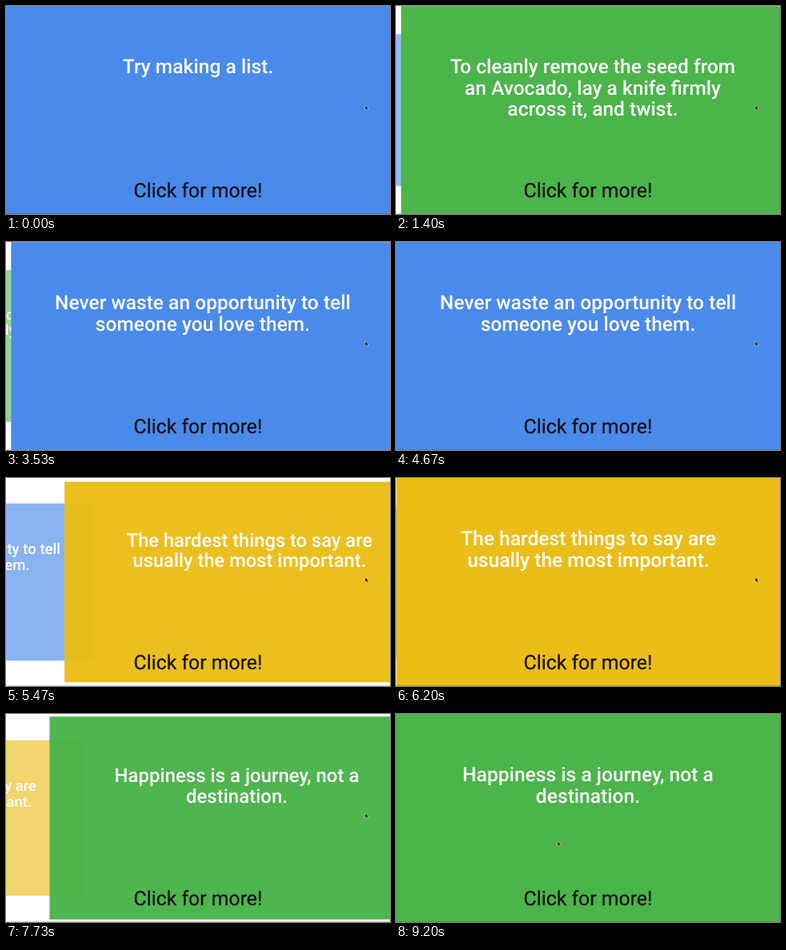
An HTML page that plays this animation: 480x260 px, repeating every 9670 ms.

```html
<!DOCTYPE html>
<html lang="en">
<head>
<meta charset="utf-8">
<title>Tip cards</title>
<style>
  html, body { margin: 0; width: 100%; height: 100%; overflow: hidden; background: #fff; }
  svg { display: block; width: 100vw; height: 100vh; }
  text { font: 400 24.8px Roboto, sans-serif; text-anchor: middle; text-rendering: geometricPrecision; }
  #cards text { font-weight: 500; font-size: 24.6px; fill: #fff; }
</style>
</head>
<body>
<svg viewBox="0 0 480 260">
  <rect width="480" height="260" fill="#fff"/>
  <g id="cards"></g>
  <rect y="259" width="480" height="1" fill="#444" fill-opacity=".25"/>
  <text x="240" y="239.4" fill="#111" stroke="#111" stroke-width=".25">Click for more!</text>
  <path id="cursor" d="M0 0V5.6L1.4 4.5L2.4 6.6L3.4 6.1L2.6 4.1H4.4Z" fill="#111" stroke="#fff" stroke-opacity=".7" stroke-width=".6"/>
</svg>
<script>
const NS = 'http://www.w3.org/2000/svg';
const LOOP = 9670, BLUE = '#4a8aeb', GREEN = '#4bb44a', YELLOW = '#ebbd17';

// start: when the card begins to slide in over the previous one
const cards = [
  { start: -Infinity, color: BLUE, lines: ['Try making a list.'] },
  { start: 600, color: GREEN, lines: ['To cleanly remove the seed from', 'an Avocado, lay a knife firmly', 'across it, and twist.'] },
  { start: 2730, color: BLUE, lines: ['Never waste an opportunity to tell', 'someone you love them.'] },
  { start: 5130, color: YELLOW, lines: ['The hardest things to say are', 'usually the most important.'] },
  { start: 7330, color: GREEN, lines: ['Happiness is a journey, not a', 'destination.'] }
];

function add(parent, tag, attrs, text) {
  const el = document.createElementNS(NS, tag);
  for (const key in attrs) el.setAttribute(key, attrs[key]);
  if (text) el.textContent = text;
  return parent.appendChild(el);
}

const deck = document.getElementById('cards');
const cursor = document.getElementById('cursor');
for (const card of cards) {
  card.el = add(deck, 'g', {});
  add(card.el, 'rect', { width: 480, height: 260, fill: card.color });
  card.lines.forEach((line, i) => add(card.el, 'text', { x: 240, y: 84.2 + 26.6 * i }, line));
}

// Share of the slide still to go: exponential ease-out, already under way at the start
function remaining(ms) {
  const decay = t => Math.exp(-0.0048 * t), end = 1200;
  return Math.max(0, (decay(ms + 70) - decay(end)) / (1 - decay(end)));
}

// Slides a card sideways by share 0..1, shrinking it in perspective and fading it
function place(card, share, shift, recede) {
  const s = 1 / (1 + recede);
  card.el.setAttribute('transform', `translate(${240 + shift * share * s} 130) scale(${s}) translate(-240 -130)`);
  card.el.setAttribute('opacity', 1 - 0.43 * share ** 1.3);
}

function render(t) {
  let now = 0;
  cards.forEach((card, i) => { if (t >= card.start) now = i; });
  const q = now ? remaining(t - cards[now].start) : 0;
  cards.forEach((card, i) => {
    const visible = i === now || (i === now - 1 && q > 0);
    card.el.setAttribute('display', visible ? 'inline' : 'none');
  });
  place(cards[now], q, 490, 0.5 * q ** 1.3);
  if (now) place(cards[now - 1], 1 - q, -478, 0.375 * (1 - q));

  const u = Math.min(1, Math.max(0, (t - 8080) / 1120));
  const e = u * u * (3 - 2 * u);
  cursor.setAttribute('transform', `translate(${449 - 247 * e} ${124.3 + 35 * e})`);
}

const origin = performance.now();
function tick() {
  render((performance.now() - origin) % LOOP);
  requestAnimationFrame(tick);
}
render(0);
requestAnimationFrame(tick);
</script>
</body>
</html>
```
